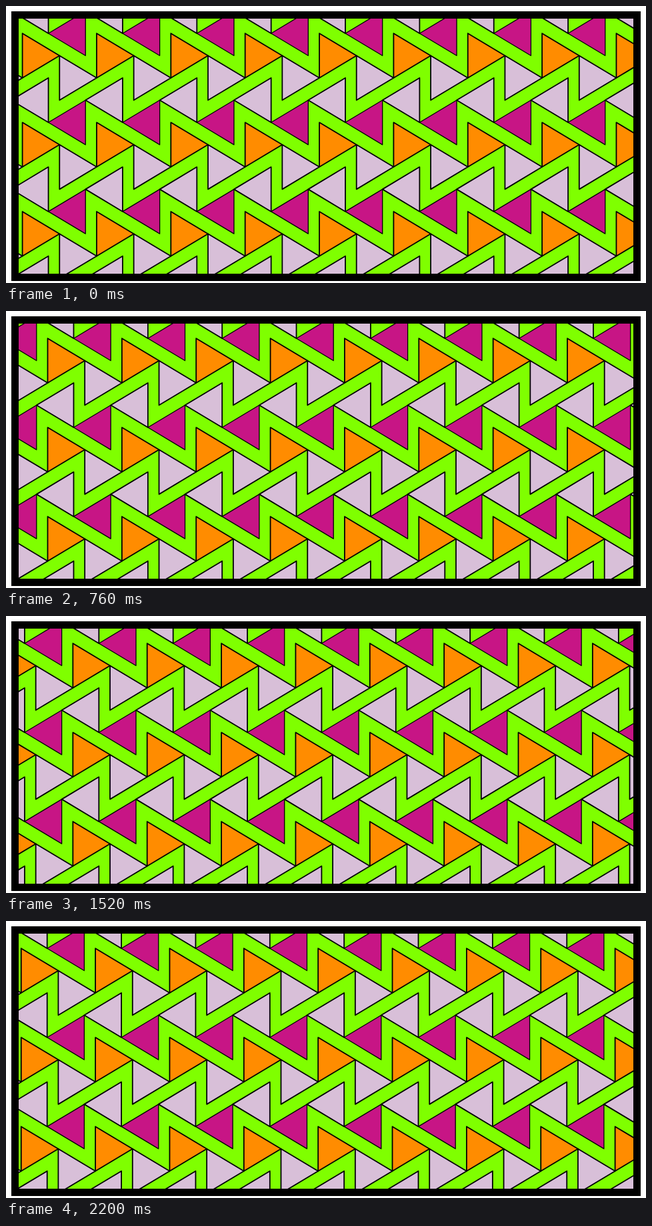
An HTML page with a canvas for the animation above (2.24 s loop, 960 px wide and 417 px high).

```html
<!DOCTYPE html>
<html lang="en">
<head>
<meta charset="utf-8">
<title>Sliding triangle tiling</title>
<style>
html, body { margin: 0; width: 100%; height: 100%; overflow: hidden; background: #fff; }
canvas { display: block; }
</style>
</head>
<body>
<canvas id="stage" width="960" height="417"></canvas>
<script>
const ctx = document.getElementById('stage').getContext('2d');
const LOOP = 2240, STEP = 40;
const W = 55.68, H = 67.05;      // triangle width and height; a tile is 2W by 2H
const GAP = 0.3 * W;             // thickness of the vertical green strips
const LEFT = 24.6, TOP = 41.2;

// Slightly uneven drift: [time, distance]
const drift = [[0, 0], [400, 21.2], [760, 37.9], [1040, 51.1],
               [1360, 68.1], [1720, 85.3], [2200, 109.5], [LOOP, 2 * W]];

function shiftAt(t) {
  const i = drift.findIndex(([time]) => time > t);
  const [t0, d0] = drift[i - 1], [t1, d1] = drift[i];
  return d0 + (d1 - d0) * (t - t0) / (t1 - t0);
}

// Vertical edge from (x, y) down, with the tip to the right (dir 1) or left (dir -1)
function triangle(x, y, dir, color, line = 1.8) {
  ctx.beginPath();
  ctx.moveTo(x, y);
  ctx.lineTo(x + dir * W, y + H / 2);
  ctx.lineTo(x, y + H);
  ctx.closePath();
  ctx.fillStyle = color;
  ctx.fill();
  ctx.lineWidth = line;
  ctx.stroke();
}

function tile(x, y) {
  triangle(x + 2 * W - GAP, y - H / 2, -1, '#c71585', 1.3);
  triangle(x, y, 1, '#ff8c00');
  triangle(x + W, y + H / 2, 1, '#d8bfd8');
  triangle(x + W - GAP, y + H, -1, '#d8bfd8');
}

function draw(now) {
  const t = Math.floor(now % LOOP / STEP) * STEP;
  const shift = shiftAt(t);
  ctx.fillStyle = '#fff';
  ctx.fillRect(0, 0, 960, 417);
  ctx.fillStyle = '#000';
  ctx.fillRect(8, 8, 944, 406);
  ctx.save();
  ctx.beginPath();
  ctx.rect(19, 19, 922, 384);
  ctx.clip();
  ctx.fillStyle = '#7fff00';
  ctx.fillRect(19, 19, 922, 384);
  ctx.strokeStyle = '#000';
  ctx.lineJoin = 'round';
  for (let row = -1; row < 4; row++)
    for (let col = -3; col < 10; col++)
      tile(LEFT + shift + col * 2 * W, TOP + row * 2 * H);
  ctx.restore();
}

const start = performance.now();
function loop() {
  draw(performance.now() - start);
  requestAnimationFrame(loop);
}
loop();
</script>
</body>
</html>
```
